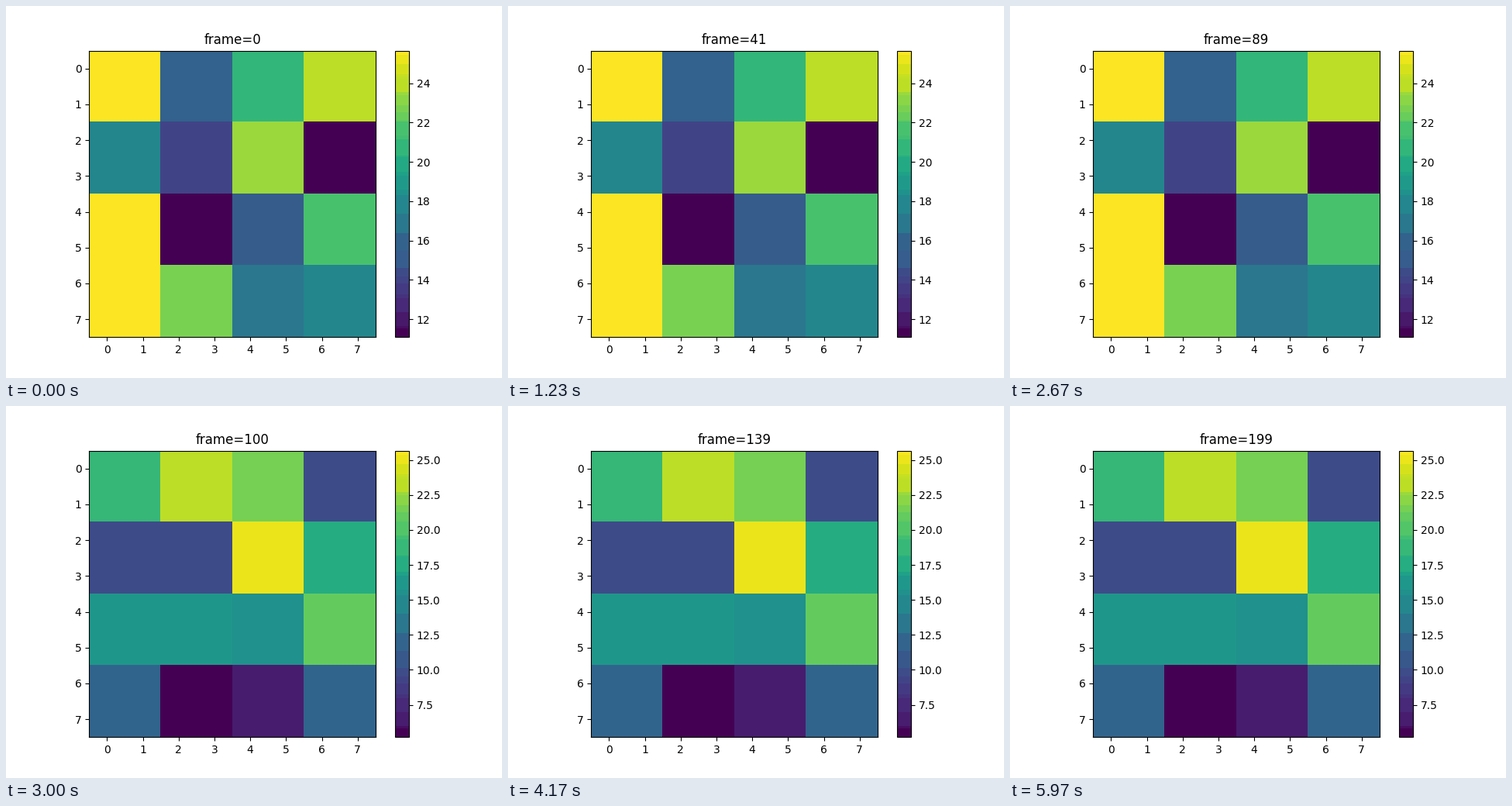
These frames come from a looping animation (640 px wide and 480 px high, 6 s). A matplotlib script:

```python
import numpy as np
import matplotlib.pyplot as plt
from matplotlib.animation import FuncAnimation
from matplotlib.colors import ListedColormap

FRAMES, INTERVAL, HOLD = 200, 30, 100
TOP = 25.66

# Lowest value and the block levels, in percent of the way up to TOP.
SCENES = [
    (11.09, "100 31 66 90  46 20 85 0  100 0 29 71  100 80 40 46"),
    (5.20, "67 90 79 23  23 23 97 62  53 53 50 76  32 0 8 32"),
]


def banded_viridis(levels):
    """Merge viridis into coarse RGB cells; colours in use dominate theirs."""
    rgb = np.round(plt.get_cmap("viridis")(np.arange(256))[:, :3] * 255)
    used = np.minimum((levels.ravel() * 256).astype(int), 255)
    weight = 1 + 300 * np.bincount(used, minlength=256)
    cell = (rgb // [32, 16, 32]) @ [256, 16, 1]
    for c in np.unique(cell):
        sel = cell == c
        rgb[sel] = np.average(rgb[sel], axis=0, weights=weight[sel])
    return ListedColormap(rgb / 255)


def prepare(low, percents):
    levels = np.array(percents.split(), float).reshape(4, 4) / 100
    data = np.kron(low + levels * (TOP - low), np.ones((2, 2)))
    return data, low, banded_viridis(levels)


scenes = [prepare(*s) for s in SCENES]

fig, ax = plt.subplots(figsize=(6.4, 4.8), dpi=100)
data, low, cmap = scenes[0]
im = ax.imshow(data, cmap=cmap, vmin=low, vmax=TOP)
ax.set(xticks=range(8), yticks=range(8))
fig.colorbar(im, ax=ax)
title = ax.set_title("frame=0")


def update(i):
    data, low, cmap = scenes[i // HOLD]
    if im.get_cmap() is not cmap:
        im.set_data(data)
        im.set_cmap(cmap)
        im.set_clim(low, TOP)
    title.set_text(f"frame={i}")
    return im, title


anim = FuncAnimation(fig, update, frames=FRAMES, interval=INTERVAL,
                     repeat=True, repeat_delay=0, blit=False)
plt.show()
```
